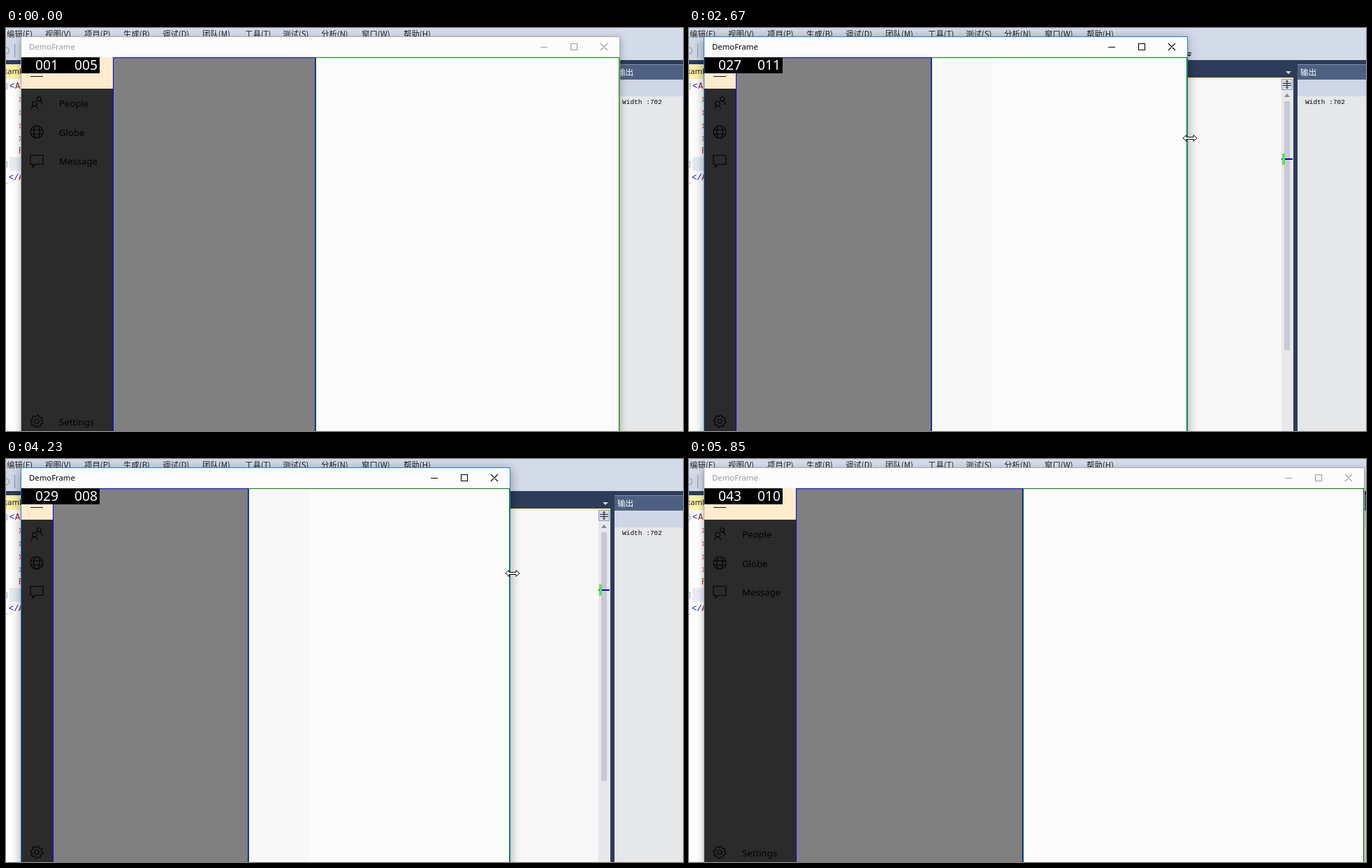
An HTML page with a canvas that plays this animation: 969 by 578 pixels, repeating every 5.94 s.

```html
<!DOCTYPE html>
<html lang="zh">
<head>
<meta charset="utf-8">
<title>DemoFrame</title>
<style>
html, body { margin: 0; width: 100%; height: 100%; overflow: hidden; }
canvas { display: block; }
</style>
</head>
<body>
<canvas id="stage" width="969" height="578"></canvas>
<script>
const c = document.getElementById('stage').getContext('2d');
const LOOP = 5940, W = 969, H = 578, LEFT = 22, TOP = 42;
const SANS = '"Noto Sans", "Open Sans", sans-serif';
const CJK = '"Noto Sans CJK SC", "Noto Sans CJK", sans-serif';
const MONO = '"Liberation Mono", monospace';

// Tracks of [time, value]
const edgeKeys = [[1080, 878], [1650, 747], [1920, 747], [2040, 765], [2190, 765], [2600, 705],
  [2670, 713], [2760, 720], [2820, 720], [3390, 614], [3600, 614], [3690, 626], [4230, 721], [4800, 832],
  [4860, 839], [5400, 958], [5520, 966]];
const gripKeys = [[870, 10], [1080, 6], [1650, 1], [2670, 4], [3690, 1.5], [4230, 4], [4860, 12], [5520, 3]];
const cursorYKeys = [[870, 144], [1650, 146], [2670, 158], [3690, 160], [4230, 164]];
const counters = [[0, '001', '005'], [1200, '008', '009'], [1920, '008', '010'], [2310, '027', '011'],
  [3000, '027', '009'], [3390, '027', '007'], [4080, '029', '008'], [4620, '029', '009'], [5190, '043', '010']];

function track(keys, t) {
  if (t <= keys[0][0]) return keys[0][1];
  for (let i = 1; i < keys.length; i++) {
    const [a, va] = keys[i - 1], [b, vb] = keys[i];
    if (t <= b) return va + (vb - va) * (t - a) / (b - a);
  }
  return keys[keys.length - 1][1];
}

function box(x, y, w, h, color) {
  c.fillStyle = color;
  c.fillRect(x, y, w, h);
}

function text(s, x, y, size, color, family = SANS, weight = 400) {
  c.font = `${weight} ${size}px ${family}`;
  c.fillStyle = color;
  c.fillText(s, x, y);
}

function stroke(d, color, width = 1, x = 0, y = 0) {
  c.save();
  c.translate(x, y);
  c.strokeStyle = color;
  c.lineWidth = width;
  c.stroke(new Path2D(d));
  c.restore();
}

function fill(d, color) {
  c.fillStyle = color;
  c.fill(new Path2D(d));
}

function drawEditor() {
  box(0, 0, W, H, '#d3dae8');
  const menu = [['编辑(E)', 1], ['视图(V)', 56], ['项目(P)', 112], ['生成(B)', 168], ['调试(D)', 224], ['团队(M)', 281],
    ['工具(T)', 342], ['测试(S)', 396], ['分析(N)', 451], ['窗口(W)', 509], ['帮助(H)', 569]];
  for (const [s, x] of menu) text(s, x, 13, 11.4, '#1e1e1e', CJK);

  // Toolbar
  box(0, 21, 709, 23, '#cfd6e5');
  box(709, 21, 13, 23, '#dce0ec');
  stroke('M0 28a4.5 4.5 0 0 1 0 9', '#9da5b5', 1.5);
  box(12, 23, 1, 19, '#8591a8');
  fill('M632 26h10v13l-5-4l-5 4z', '#25272e');
  for (const x of [654, 674, 694]) {
    fill(`M${x + 5} 27h6v10l-3-3l-3 3z`, '#a9afbd');
    stroke('M0 30h5M3 28l-3 2l3 2', '#a0a7b6', 1.3, x);
  }
  box(713, 35, 6, 1.5, '#1e1e1e');
  fill('M713 38h6l-3 3z', '#1e1e1e');

  // Document well
  box(0, 46, W, 26, '#2d3c59');
  box(0, 52, 60, 20, '#fff0a5');
  text('xaml', -4, 66, 11.4, '#1e1e1e');
  box(0, 71, 865, 2, '#fff0a5');
  fill('M854 62h8l-4 4z', '#d5dcea');
  box(0, 73, 848, H, '#f8f8f8');
  box(0, 73, 22, H, '#fff');
  box(5, 185, 20, 20, '#e6ecf3');
  for (const y of [79, 191]) stroke(`M-6 ${y + .5}h7.5v8h-7.5`, '#a5a5a5');
  text('<', 5, 87, 12, '#00f', MONO);
  text('A', 13, 87, 12, '#a31515', MONO);
  text('</', 4, 218, 12, '#00f', MONO);
  text('A', 18, 218, 12, '#a31515', MONO);
  for (const y of [106, 125, 144, 162]) text('x', 18, y, 12, '#e02020', MONO);
  text('R', 18, 180, 12, '#e02020', MONO);
  box(0, 222, 2, 1, '#a5a5a5');

  // Scroll bar
  box(848, 73, 17, H, '#e8e8ec');
  box(848, 73, 16, 16, '#d6dded');
  stroke('M848.5 73.5h15v15h-15z', '#8f9bb3');
  stroke('M850 79.5h12M850 82.5h12M856 75v12M854 77.5l2-2l2 2M854 84.5l2 2l2-2', '#1e1e1e');
  fill('M852 99h8l-4-5z', '#868999');
  box(852, 105, 8, 357, '#c7c9d3');
  box(848, 187, 16, 2, '#0000cd');
  box(849, 180, 4, 16, '#62dc62');

  // Output panel
  box(865, 46, 6, H, '#2d3c59');
  box(871, 52, 98, 22, '#4d6082');
  box(871, 52, 98, 1, '#8391ab');
  box(871, 74, 98, 24, '#cfd6e5');
  box(871, 98, 98, H, '#e5e7e9');
  text('输出', 875, 68, 11.6, '#fff', CJK);
  text('Width :702', 882, 108.5, 9.5, '#000', MONO);
}

function gearPath() {
  let d = '';
  for (let i = 0; i < 32; i++) {
    const a = (i + .5) * Math.PI / 16, r = i % 4 < 2 ? 9 : 7;
    d += `${i ? 'L' : 'M'}${(r * Math.cos(a)).toFixed(2)} ${(r * Math.sin(a)).toFixed(2)}`;
  }
  return d + 'ZM3 0a3 3 0 1 0-6 0a3 3 0 1 0 6 0';
}

const items = [
  ['People', 107, 'M.3 1.5a3.3 3.3 0 1 0-6.6 0a3.3 3.3 0 1 0 6.6 0M-7.5 9.5a4.5 4.7 0 0 1 9 0M6.5-5.3a3 3 0 1 0-6 0a3 3 0 1 0 6 0M2.3-1.9q5-1 5.7 5'],
  ['Globe', 149, 'M9 0a9 9 0 1 0-18 0a9 9 0 1 0 18 0M4.3 0a4.3 9 0 1 0-8.6 0a4.3 9 0 1 0 8.6 0M-8.5-3h17M-8.5 3h17'],
  ['Message', 190, 'M-9-7.5h18v13h-11l-4 4v-4h-3z'],
  ['Settings', 564, gearPath()]
];

function drawPane(pane, open) {
  box(LEFT, TOP, pane - LEFT, H, '#2b2b2b');
  box(LEFT, TOP, pane - LEFT, 45, '#ffebcd');
  stroke('M35 59.5h18M35 64.5h18M35 69.5h18', '#111');
  for (const [name, y, icon] of items) {
    stroke(icon, '#000', 1.15, 44, y);
    if (open) text(name, 76, y + 6, 13.2, '#000');
  }
}

function drawWindow(t, right) {
  const active = t >= 870 && t < 5820;
  const ink = active ? '#000' : '#999';
  const border = active ? '#1883d7' : '#aaa';

  c.save();
  c.shadowColor = active ? 'rgba(0,0,0,.38)' : 'rgba(0,0,0,.3)';
  c.shadowBlur = active ? 14 : 10;
  c.shadowOffsetY = 3;
  box(21, 12, right - 20, H + 30, border);
  c.restore();

  box(LEFT, 13, right - LEFT, H, '#fcfcfc');
  text('DemoFrame', 33, 31, 11.35, ink);
  stroke('M-113 27.5h10M-69.5 22.5h9v9h-9zM-27 22l10 10M-17 22l-10 10', ink, 1.1, right);

  // Adaptive layout: open, compact or hidden pane
  if (right > 685) {
    const open = right > 772, pane = open ? 153 : 67;
    const split = Math.round(pane + Math.max(280, .4 * (right - pane)));
    if (!open) box(split, 43, 434 - split, H, '#f8f8f8');
    drawPane(pane, open);
    box(pane, TOP, split - pane, H, '#808080');
    c.lineWidth = 1;
    c.strokeStyle = '#00f';
    c.strokeRect(pane + .5, TOP + .5, split - pane - 1, H);
    c.strokeStyle = '#008000';
    c.strokeRect(split + .5, TOP + .5, right - split - 1, H);
  } else {
    box(LEFT, TOP, 434 - LEFT, H, '#f8f8f8');
  }

  const [, fps, ms] = counters.filter(k => k[0] <= t).pop();
  box(LEFT, TOP, 112, 23, '#000');
  text(fps, 42, 59.5, 19.3, '#fff', SANS, 500);
  text(ms, 98, 59.5, 19.3, '#fff', SANS, 500);

  if (active) {
    const d = 'M-10 0l5-4.5v3h10v-3l5 4.5l-5 4.5v-3h-10v3z';
    c.save();
    c.translate(right + track(gripKeys, t), track(cursorYKeys, t));
    fill(d, '#fff');
    stroke(d, '#000');
    c.restore();
  }
}

function frame(now) {
  const t = Math.floor(now % LOOP / 30) * 30;
  drawEditor();
  drawWindow(t, Math.round(track(edgeKeys, t)));
  requestAnimationFrame(frame);
}
requestAnimationFrame(frame);
</script>
</body>
</html>
```
